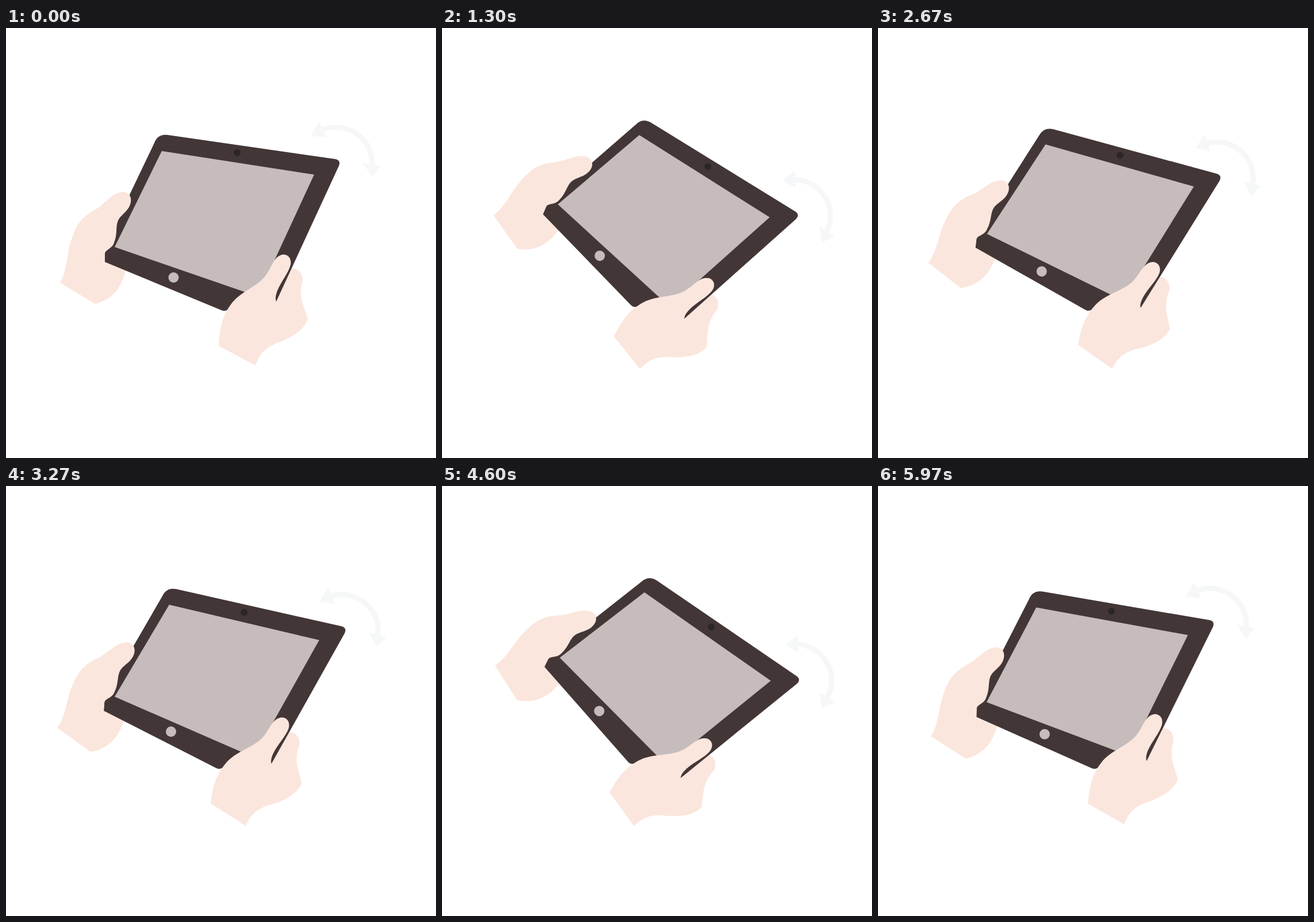
Recreate the animation shown at these times as an HTML page. Size 748x748 px, loop 6010 ms.

```html
<!DOCTYPE html>
<html lang="en">
<head>
<meta charset="utf-8">
<title>Tilting tablet</title>
<style>
  html, body { margin: 0; width: 100%; height: 100%; overflow: hidden; background: #fff; }
  svg { display: block; width: 100vw; height: 100vh; }
  .skin { fill: #fbe6dd; }
  .case { fill: #433636; }
  .glass { fill: #c6bcbc; }
  .arrow { fill: #f5f7f8; }
</style>
</head>
<body>
<svg viewBox="0 0 748 748">
  <g id="scene">
    <path class="arrow" d="M531 188L544 163L557 190ZM637 259L621 235L652 240Z"/>
    <path d="M548 178C590 160 639 190 637 239" fill="none" stroke="#f5f7f8" stroke-width="9"/>

    <!-- palm and fingers behind the tablet -->
    <path class="skin" d="M94 443L155 480C188 472 203 447 209 418L190 380L150 370Z"/>
    <path class="skin" d="M460 440L497 418C509 418 517 428 516 440C512 452 512 465 516 480L525 506C520 523 500 537 475 547L440 500Z"/>

    <path class="case" d="M281 186L573 228Q583 230 579 240L470 476L450 500L388 488Q382 494 375 491L172 407V380L258 200Q264 184 281 186Z"/>
    <path class="glass" d="M271 214L536 255L438 467L189 381Z"/>
    <circle cx="402" cy="217" r="6" fill="#2b2627"/>
    <circle class="glass" cx="291.5" cy="434" r="9"/>

    <!-- thumbs in front -->
    <path class="skin" d="M94 443C108 418 105 393 114 368C123 338 136 326 160 313C176 301 186 287 203 285C213 285 219 293 217 303C214 319 200 324 195 335C190 346 195 358 187 376C183 384 173 386 172 392V408L155 450Z"/>
    <path class="skin" d="M370 553C371 522 377 500 391 481C407 459 433 452 449 434C463 418 464 397 482 394C492 394 497 402 495 412C491 427 479 440 472 457C469 465 468 471 470 476L490 470L516 480L525 506C515 530 494 539 471 548C450 557 441 567 434 587Z"/>
  </g>
</svg>
<script>
const LOOP = 6010, STEP = 100 / 3, LAST = 179;
// [time in ms, tilt in degrees], constant speed in between
const swing = [[0, 0], [1530, 27.6], [3037, 0.35], [4532, 27.4], [6010, 0.73]];
const scene = document.getElementById("scene");

function tilt(t) {
  const i = swing.findIndex(key => key[0] > t);
  const [t0, a0] = swing[i - 1], [t1, a1] = swing[i];
  return a0 + (a1 - a0) * (t - t0) / (t1 - t0);
}

function draw() {
  const t = performance.now() % LOOP;
  const step = Math.min(LAST, Math.floor((t + 4) / STEP));
  scene.setAttribute("transform", `rotate(${tilt(step * STEP)} 374 374)`);
  requestAnimationFrame(draw);
}
draw();
</script>
</body>
</html>
```
